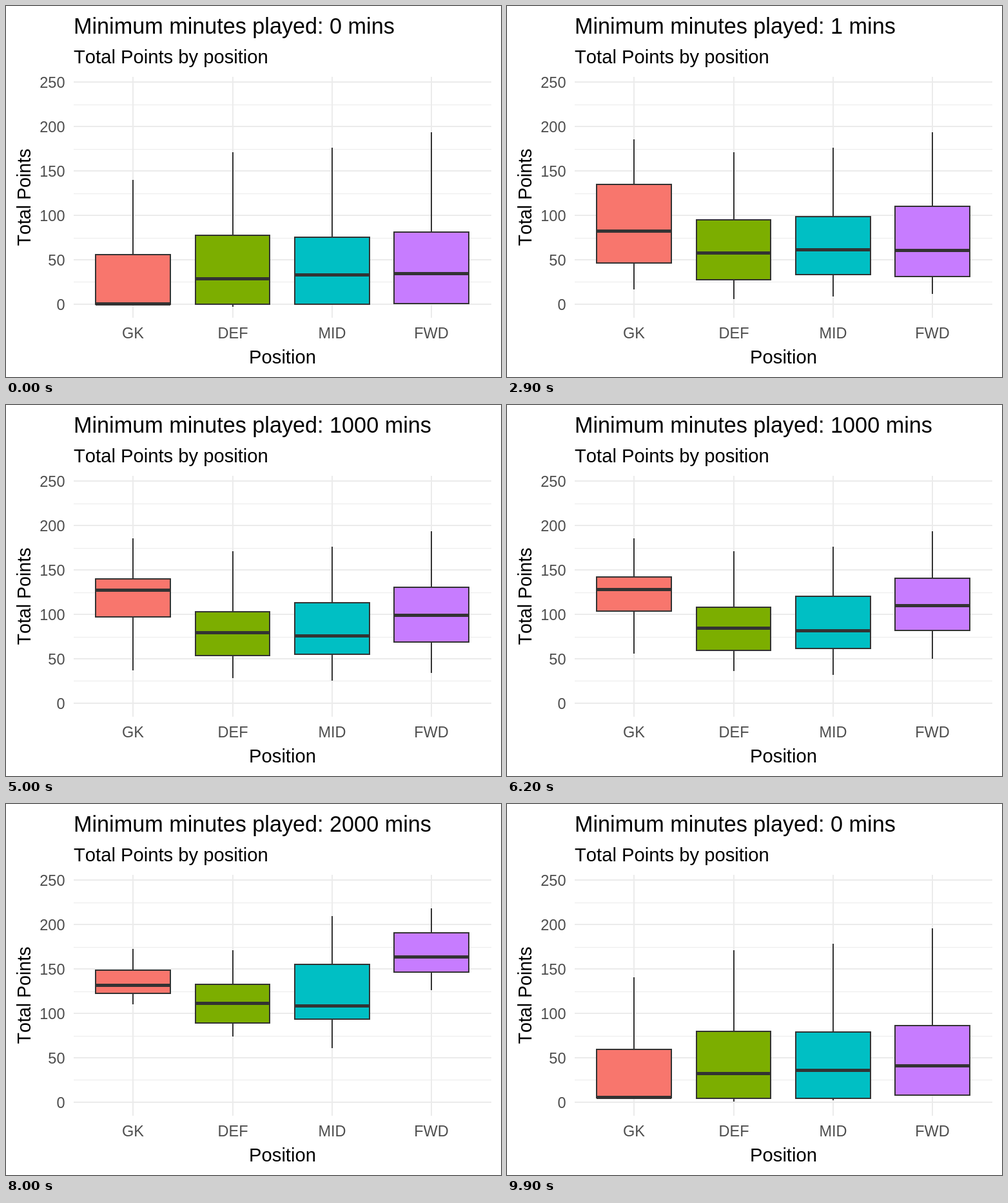
These frames come from a looping animation (768 by 576 pixels, 10000 ms). An HTML page with a canvas:

```html
<!DOCTYPE html>
<html lang="en">
<head>
<meta charset="utf-8">
<title>Total Points by position</title>
<style>
html, body { margin: 0; width: 100%; height: 100%; overflow: hidden; background: #fff; }
canvas { display: block; }
</style>
</head>
<body>
<canvas id="chart" width="768" height="576"></canvas>
<script>
const ctx = document.getElementById('chart').getContext('2d');

const LOOP = 10000, TICK = 100, STEPS = 8;
const HOLD = 900, CYCLE = 1700, LAST_START = 9300;
const LEFT = 105, RIGHT = 753, TOP = 110, BOTTOM = 484;
const SLOT = (RIGHT - LEFT) / 4.2, BOX = SLOT * 0.75;
const GRID = '#EBEBEB', INK = '#333333', GREY = '#4D4D4D';

const minutes = [0, 1, 500, 1000, 2000, 3000];

// Key summaries per position. all: median, Q3. played: Q1 to Q3.
// half and full: lower whisker to Q3. tops: best scores.
// early and late: how far the stages between the keys have moved.
const groups = [
  { name: 'GK', fill: '#F8766D', floor: 0, all: [1, 56], played: [7, 47.5, 131.5],
    half: [37, 97, 127.5, 140], full: [123, 127, 132.5, 150],
    tops: [140, 160, 186], early: 0.88, late: 0.7 },
  { name: 'DEF', fill: '#7CAE00', floor: -3, all: [29, 77.5], played: [17.5, 50, 91.5],
    half: [28.5, 53.5, 79.5, 103], full: [94, 105.5, 126, 146],
    tops: [171], early: 0.55, late: 0.38 },
  { name: 'MID', fill: '#00BFC4', floor: -1, all: [33, 75.5], played: [22, 53.5, 90.5],
    half: [25.5, 55, 76, 113], full: [77, 111, 123.5, 174],
    tops: [176, 244], early: 0.7, late: 0.38 },
  { name: 'FWD', fill: '#C77CFF', floor: 1, all: [35, 81], played: [12.5, 42, 100],
    half: [34, 69, 99, 130.5], full: [168, 181, 193.5, 217.5],
    tops: [194, 242], early: 0.65, late: 0.38 }
];

const mix = (a, b, p) => a.map((v, i) => v + (b[i] - v) * p);
const sineInOut = p => (1 - Math.cos(Math.PI * p)) / 2;
const yOf = v => Math.floor(463.4 - 1.378 * v);

// The upper whisker is the best score within 1.5 box heights above the box.
function addWhisker(box, tops) {
  const [, q1, , q3] = box;
  const fence = q3 + 1.5 * (q3 - q1);
  return [...box, Math.max(...tops.filter(v => v <= fence))];
}

function stagesOf({ floor, all, played, half, full, tops, early, late }) {
  const any = [floor, ...played];
  const boxes = [
    [floor, Math.max(0, floor), ...all],
    any, mix(any, half, early), half, mix(half, full, late), full
  ];
  return boxes.map(box => addWhisker(box, tops));
}

groups.forEach((g, i) => {
  const center = LEFT + 0.2 + SLOT * (i + 0.6);
  g.x = Math.floor(center);
  g.left = Math.floor(center - BOX / 2);
  g.right = Math.floor(center + BOX / 2);
  g.stages = stagesOf(g);
});

function line(x1, y1, x2, y2, width, color) {
  ctx.lineWidth = width;
  ctx.strokeStyle = color;
  ctx.beginPath();
  ctx.moveTo(x1, y1);
  ctx.lineTo(x2, y2);
  ctx.stroke();
}

function text(str, x, y, size, color = '#000', align = 'left') {
  ctx.font = `${size}px "Liberation Sans", Arial, sans-serif`;
  ctx.fontKerning = 'none';
  ctx.textAlign = align;
  ctx.fillStyle = color;
  ctx.fillText(str, x, y);
}

function drawGrid() {
  for (let v = 25; v < 250; v += 50) {
    const y = yOf(v) + 0.5;
    line(LEFT, y, RIGHT, y, 1, GRID);
  }
  for (let v = 0; v <= 250; v += 50) {
    const y = yOf(v);
    line(LEFT, y, RIGHT, y, 2, GRID);
    text(v, 91.5, y + 9, 23.5, GREY, 'right');
  }
  for (const g of groups) {
    line(g.x, TOP, g.x, BOTTOM, 2, GRID);
    text(g.name, g.x, 516, 23.5, GREY, 'center');
  }
}

function drawLabels(mins) {
  text(`Minimum minutes played: ${mins} mins`, 105, 43, 34.2);
  text('Total Points by position', 105, 89, 29.2);
  text('Position', 429, 555, 29.2, '#000', 'center');
  ctx.save();
  ctx.translate(38, 297);
  ctx.rotate(-Math.PI / 2);
  text('Total Points', 0, 0, 28.6, '#000', 'center');
  ctx.restore();
}

function drawBox(g, values) {
  const [low, q1, mid, q3, high] = values.map(yOf);
  const rect = [g.left, q3, g.right - g.left, q1 - q3];
  line(g.x, q3, g.x, high, 2, INK);
  line(g.x, q1, g.x, low, 2, INK);
  ctx.fillStyle = g.fill;
  ctx.fillRect(...rect);
  ctx.strokeRect(...rect);
  line(g.left, mid + 0.5, g.right, mid + 0.5, 5, INK);
}

function draw(now) {
  const t = now % LOOP;
  const from = t >= LAST_START ? 5 : Math.min(4, Math.max(0, Math.floor((t - HOLD) / CYCLE)));
  const to = (from + 1) % minutes.length;
  const start = Math.min(HOLD + CYCLE * from, LAST_START);
  const step = Math.floor((t - start) / TICK) + 1;
  const p = Math.max(0, Math.min(1, step / STEPS));

  ctx.fillStyle = '#fff';
  ctx.fillRect(0, 0, 768, 576);
  drawGrid();
  for (const g of groups) drawBox(g, mix(g.stages[from], g.stages[to], sineInOut(p)));
  drawLabels(minutes[p > 0.5 ? to : from]);
  requestAnimationFrame(draw);
}

draw(performance.now());
</script>
</body>
</html>
```
